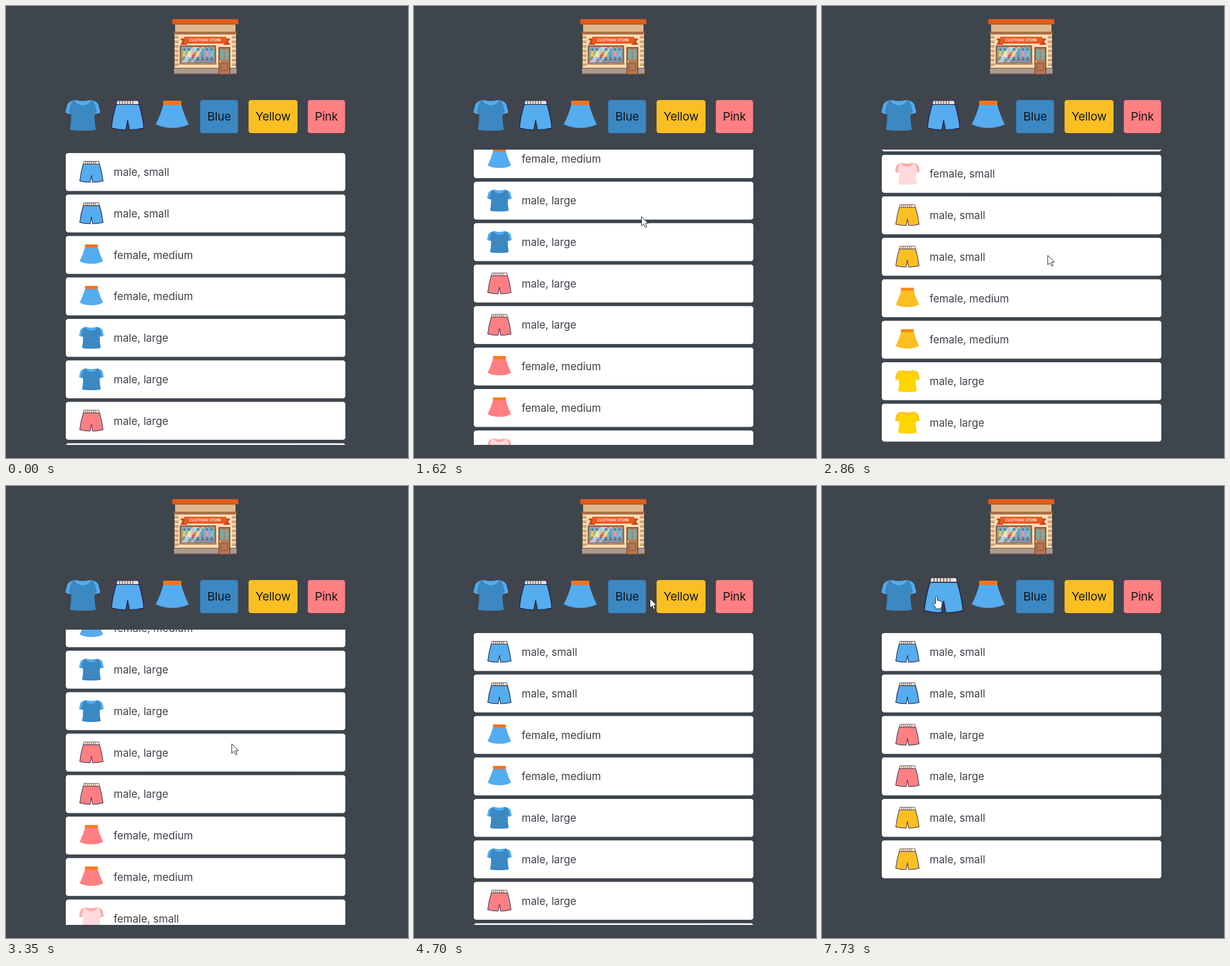
Recreate the animation shown at these times as an HTML page. Size 706 px wide and 793 px high, loop 7990 ms.

```html
<!DOCTYPE html>
<html lang="en">
<head>
<meta charset="utf-8">
<title>Clothing store filter</title>
<style>
  html, body { margin: 0; width: 100%; height: 100%; overflow: hidden; background: #3f454d; }
  svg { display: block; }
  text { font-family: Inter, "Open Sans", sans-serif; }
  .row text { font-size: 18.5px; fill: #3f414b; }
  .button { font-size: 20.5px; letter-spacing: -.2px; fill: #14161a; text-anchor: middle; }
</style>
</head>
<body>
<svg id="stage" width="100%" height="100%" viewBox="0 0 706 793">
  <rect width="706" height="793" fill="#3f454d"/>
  <g id="store"></g>
  <g id="filters"></g>
  <svg x="105" y="252" width="491" height="518" viewBox="105 252 491 518"><g id="list"></g></svg>
  <g id="cursor">
    <path id="arrow" d="M.5 .5V17L4.4 13.4L7.2 19.4L9.8 18.2L7.1 12.3H12.2Z" fill="#fff" stroke="#20242a" stroke-linejoin="round"/>
    <path id="hand" d="M-1.5 1.8Q0 -.6 1.5 1.8V8Q3.5 6.6 4.6 8.6Q6.6 7.6 7.4 9.6Q9.6 9 9.8 11.6V16Q9.6 19 7.8 20.2V22.6H-1.2V20.6Q-3.6 17.6 -5.6 13.8Q-5.6 11.4 -3.4 12L-1.5 14Z" fill="#fff" stroke="#20242a" stroke-linejoin="round"/>
  </g>
</svg>
<script>
const LOOP = 7990, PITCH = 72.75, TOP = 258;
const el = id => document.getElementById(id);
const rect = (x, y, w, h, fill, r = 0) =>
  `<rect x="${x}" y="${y}" width="${w}" height="${h}" rx="${r}" fill="${fill}"/>`;
const path = (d, fill, more = '') => `<path d="${d}" fill="${fill}" ${more}/>`;

const COLORS = {
  blue: { shirt: '#3b88c3', trim: '#55acee', main: '#55acee', band: '#f97316', line: '#272b4d' },
  pink: { shirt: '#ffd9dc', trim: '#ffaaa4', main: '#ff7f83', band: '#f97d16', line: '#4b4358' },
  yellow: { shirt: '#ffd500', trim: '#fcc526', main: '#fbbf24', band: '#f58a12', line: '#564653' }
};

// Icons are drawn around their own centre
const ICONS = {
  shirt: c =>
    path('M-13 -26.5Q0 -23 13 -26.5Q25 -25 27.5 -18L30.5 -5Q27 -2 20.5 -2L20 -10H-20L-20.5 -2Q-27 -2 -30.5 -5L-27.5 -18Q-25 -25 -13 -26.5Z', c.trim) +
    path('M-12.5 -26C-9 -16 9 -16 12.5 -26L17 -25Q23 -20 24.5 -4L20.5 -3.5Q20 12 23 24.5Q22 27.3 0 27.3Q-22 27.3 -23 24.5Q-20 12 -20.5 -3.5L-24.5 -4Q-23 -20 -17 -25Z', c.shirt) +
    path('M-12.5 -26C-9 -16.5 9 -16.5 12.5 -26', 'none', `stroke="${c.trim}" stroke-width="3"`),
  shorts: c => {
    let ticks = '';
    for (let x = -14; x <= 14; x += 4.7) ticks += `M${x} -25V-20`;
    return path('M-20 -19Q-26 0 -28.7 22.5Q-16 26 -3 25.8L0 9L3 25.8Q16 26 28.7 22.5Q26 0 20 -19Z', c.main, `stroke="${c.line}" stroke-width="1.7" stroke-linejoin="round"`) +
      path('M-18.5 -25.7H18.5L20 -19H-20Z', '#ffe6d0', `stroke="${c.line}" stroke-width="1.2"`) +
      path(ticks, 'none', `stroke="${c.line}" stroke-width="1.1"`);
  },
  skirt: c =>
    path('M-15.5 -19H15.5Q20 -2 29 16Q17 22.5 0 22.5Q-17 22.5 -29 16Q-20 -2 -15.5 -19Z', c.main) +
    rect(-16, -25.5, 32, 7.5, c.band, 1)
};
const icon = (kind, color) => ICONS[kind](COLORS[color]);

function drawStore() {
  let s = rect(297, 32, 106, 14, '#dfb88c') + rect(292, 23, 116, 9, '#e45b17', 1) +
    rect(295, 31, 110, 1.5, '#b9431a') + rect(296, 50, 108, 60, '#f8dfb4') +
    rect(295, 45, 110, 5, '#aa7048') + rect(295, 109, 110, 10, '#a99a92') +
    rect(295, 108.5, 110, 1.5, '#8e6551') + rect(295, 118, 110, 1.5, '#8b6d5f');
  for (let y = 52; y < 108; y += 8)
    s += rect(296, y, 7, 4, '#e2b37f') + rect(397, y, 7, 4, '#e2b37f') +
      rect(296, y + 3.5, 7, 1, '#9c6944') + rect(397, y + 3.5, 7, 1, '#9c6944');
  s += path('M306 57H318V68H306L310 62.5ZM394 57H382V68H394L390 62.5Z', '#ca431c') +
    rect(313, 54, 74, 12, '#ea5a20') +
    '<text x="350" y="62.4" font-size="6.4" font-weight="600" fill="#fff" text-anchor="middle">CLOTHING STORE</text>' +
    rect(305, 69, 64, 33, '#9a6749') + rect(308, 72, 58, 27, '#7bb1c4') +
    rect(308, 92, 58, 7, '#8296b0') + rect(304, 100, 66, 3, '#bf8861');
  ['#f3c33a', '#f5d449', '#e95745', '#f2bf33', '#5aa3c9', '#ee8d9a', '#6cc4dd'].forEach((c, i) => {
    const x = 313 + i * 8;
    s += `<circle cx="${x}" cy="76" r="1.5" fill="#4c4b55"/>` +
      path(`M${x - 2} 79H${x + 2}L${x + 3.2} 89H${x - 3.2}Z`, c) +
      path(`M${x - 1} 89V96M${x + 1} 89V96`, 'none', 'stroke="#544c55" stroke-width=".9"');
  });
  s += path('M328 72H338L318 99H308ZM344 72H348L328 99H324Z', '#fff', 'opacity=".5"') +
    rect(373, 72, 21, 48, '#8b563c') + rect(375, 74, 17, 45, '#b57852') +
    rect(376.5, 76, 6, 18, '#70aeb4') + rect(384.5, 76, 6, 18, '#70aeb4') +
    rect(377, 100, 13, 14, '#9a6245') + rect(379, 102, 9, 10, '#b57852') +
    rect(375, 95, 2, 4, '#f0c75d');
  el('store').innerHTML = s;
}

const BIG = { shirt: 135, shorts: 213.6, skirt: 292 };
function drawFilters() {
  const button = (x, w, fill, label) => rect(x, 165, w, 58, fill, 4.5) +
    `<text class="button" x="${x + w / 2}" y="200.5">${label}</text>`;
  el('filters').innerHTML =
    Object.keys(BIG).map(k => `<g id="${k}">${icon(k, 'blue')}</g>`).join('') +
    button(341, 66.5, '#3b88c3', 'Blue') + button(426, 86, '#fbbf24', 'Yellow') +
    button(530, 65.5, '#ff8083', 'Pink');
}

// Each item is listed twice in a row
const ITEMS = [
  ['shorts', 'blue', 'male, small'], ['skirt', 'blue', 'female, medium'], ['shirt', 'blue', 'male, large'],
  ['shorts', 'pink', 'male, large'], ['skirt', 'pink', 'female, medium'], ['shirt', 'pink', 'female, small'],
  ['shorts', 'yellow', 'male, small'], ['skirt', 'yellow', 'female, medium'], ['shirt', 'yellow', 'male, large']
].flatMap(item => [item, item]);

function drawList() {
  el('list').innerHTML = ITEMS.map(([kind, color, label]) =>
    `<g class="row">${rect(105, 0, 491, 66.5, '#fff', 4.5)}
     <g transform="translate(150 32.8) scale(.712)">${icon(kind, color)}</g>
     <text x="189" y="40">${label}</text></g>`).join('');
}

drawStore();
drawFilters();
drawList();
const rows = [...document.querySelectorAll('.row')];

// Bursts of movement: start, end, number of steps
const BURSTS = [
  [400, 530, 3], [670, 1360, 11], [1490, 2250, 12], [2320, 2530, 4], [2860, 3490, 10], [3760, 3890, 3],
  [4360, 4910, 9], [5510, 6260, 11], [6330, 6390, 2], [6790, 7260, 7], [7600, 7730, 2]
];
const SCROLL = [[1420, 0], [1628, 240.5], [1974, 727.5], [2250, 780], [2530, 797.5],
  [2790, 797.5], [2860, 797], [3140, 500], [3350, 260], [3490, 197.5], [3760, 160], [3890, 0]];
const POINTER = [
  [400, 668, 759], [465, 680, 721], [670, 694, 489], [740, 640, 465], [880, 540, 410], [1050, 450, 365],
  [1200, 415, 357], [1360, 401, 367], [1490, 399, 369], [2250, 399, 369], [2530, 396, 437], [2860, 396, 437],
  [3490, 396, 456], [3890, 396, 456], [4360, 399, 446], [4500, 415, 370], [4630, 421, 270], [4700, 415, 200],
  [4800, 375, 120], [4910, 337, 80], [5510, 334, 84], [5660, 290, 115], [5735, 240, 140], [5810, 190, 160],
  [5885, 160, 180], [5960, 153, 192], [6035, 154, 196], [6790, 157, 196], [7025, 185, 194], [7260, 201, 193]
];
const GROW = {
  shirt: [[5810, 1], [6035, 1.2], [6870, 1.2], [7100, 1]],
  shorts: [[6950, 1], [7180, 1.2]]
};

function snap(t) {
  let at = 0;
  for (const [a, b, n] of BURSTS) {
    if (t < a) break;
    const d = (b - a) / (n - 1);
    at = Math.min(b, a + d * Math.floor((t - a) / d + .15));
  }
  return at;
}

function sample(keys, t) {
  const i = keys.findIndex(k => k[0] > t);
  if (i === 0) return keys[0].slice(1);
  if (i < 0) return keys[keys.length - 1].slice(1);
  const a = keys[i - 1], b = keys[i], p = (t - a[0]) / (b[0] - a[0]);
  return a.slice(1).map((v, j) => v + (b[j + 1] - v) * p);
}

function draw(time) {
  const t = snap(time);
  const only = t >= 7600 ? 'shorts' : t >= 6330 ? 'shirt' : '';
  const [scroll] = sample(SCROLL, t);
  let n = 0;
  rows.forEach((row, i) => {
    const on = !only || ITEMS[i][0] === only;
    row.style.display = on ? '' : 'none';
    if (on) row.setAttribute('transform', `translate(0 ${TOP + n++ * PITCH - scroll})`);
  });

  for (const k in BIG) {
    const size = GROW[k] ? sample(GROW[k], t)[0] : 1;
    el(k).setAttribute('transform', `translate(${BIG[k]} 191.5) scale(${size})`);
  }

  const [x, y] = sample(POINTER, t);
  const over = y > 165 && y < 222 && (Math.abs(x - BIG.shirt) < 31 || Math.abs(x - BIG.shorts) < 30);
  el('cursor').style.display = t < 400 || (t >= 530 && t < 670) ? 'none' : '';
  el('cursor').setAttribute('transform', `translate(${Math.round(x)} ${Math.round(y)})`);
  el('arrow').style.display = over ? 'none' : '';
  el('hand').style.display = over ? '' : 'none';
}

const start = performance.now();
function tick() {
  draw((performance.now() - start) % LOOP);
  requestAnimationFrame(tick);
}
draw(0);
requestAnimationFrame(tick);
</script>
</body>
</html>
```
